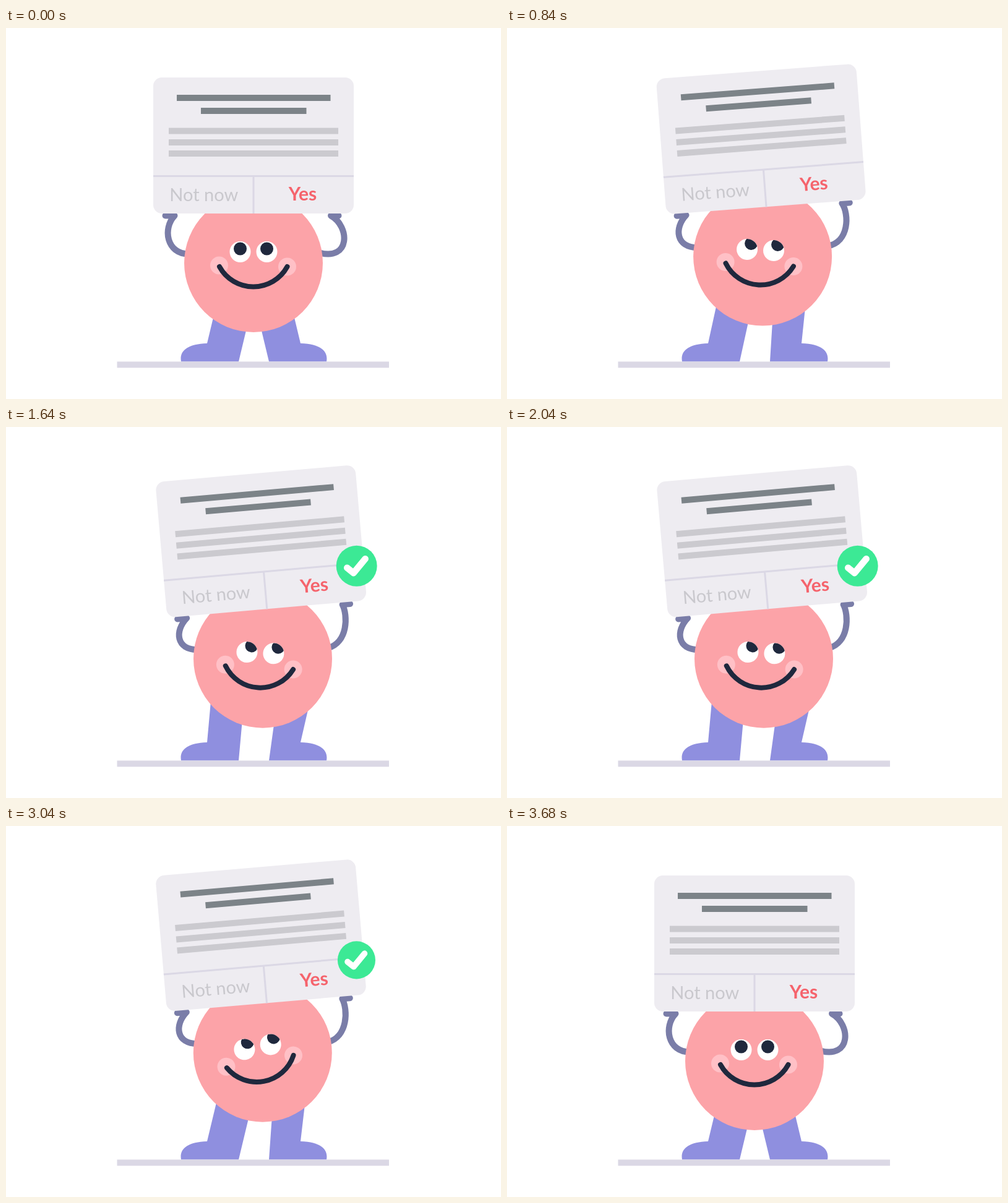
These frames come from a looping animation (800x600 px, 4.04 s). An HTML page:

```html
<!DOCTYPE html>
<html lang="en">
<head>
<meta charset="utf-8">
<title>Friendly prompt</title>
<style>
  html, body { margin: 0; width: 100%; height: 100%; overflow: hidden; background: #fff; }
  svg { display: block; width: 100vw; height: 100vh; }
  text { font: 29px Lato, sans-serif; text-anchor: middle; }
  .yes { font-size: 30px; font-weight: 700; }
</style>
</head>
<body>
<svg viewBox="0 0 800 600">
  <defs>
    <clipPath id="lidClip"><rect id="lid" x="-60" width="120" height="60"/></clipPath>
    <clipPath id="eyeClip"><circle cx="-21.5" cy="-18" r="17"/><circle cx="21.5" cy="-18" r="17"/></clipPath>
  </defs>
  <g fill="#8f8fdf">
    <path id="legL"/>
    <path id="legR" transform="matrix(-1 0 0 1 801 0)"/>
  </g>
  <rect x="179.5" y="539.5" width="439.5" height="10" fill="#dbd8e5"/>
  <g fill="none" stroke="#7a7da8" stroke-width="10" stroke-linecap="round" stroke-linejoin="round">
    <path id="armL"/>
    <path id="armR"/>
  </g>
  <circle id="head" r="112" fill="#fca3a8"/>
  <g id="face">
    <g fill="#ffc0c6"><circle cx="-55.5" cy="4" r="14.5"/><circle cx="54.5" cy="6" r="14.5"/></g>
    <path d="M-55 6A62.4 62.4 0 0 0 54.5 6" fill="none" stroke="#1f283d" stroke-width="8" stroke-linecap="round"/>
    <g clip-path="url(#lidClip)">
      <g fill="#fff"><circle cx="-21.5" cy="-18" r="17"/><circle cx="21.5" cy="-18" r="17"/></g>
      <g clip-path="url(#eyeClip)">
        <g id="pupils" fill="#1f283d"><circle cx="-21.5" cy="-18" r="10.5"/><circle cx="21.5" cy="-18" r="10.5"/></g>
      </g>
    </g>
  </g>
  <g id="card">
    <rect x="-162" y="-110" width="324" height="220" rx="14" fill="#eeecf1"/>
    <path d="M-124-77h248.5M-85-56h170.5" stroke="#7c8388" stroke-width="10"/>
    <path d="M-137-23.5h274M-137-5h274M-137 13h274" stroke="#cbcacf" stroke-width="10"/>
    <path d="M-162 49.5h324M0 49.5V110" stroke="#dbd8e5" stroke-width="3"/>
    <text x="-80.2" y="90" fill="#c9c8cd">Not now</text>
    <text x="79.5" y="89" fill="#f5636c" class="yes">Yes</text>
  </g>
  <g id="badge">
    <circle r="33" fill="#3ce995"/>
    <path d="M-15.5 3L-5 11.5L14-11.5" fill="none" stroke="#fff" stroke-width="10.5" stroke-linecap="round" stroke-linejoin="round"/>
  </g>
</svg>
<script>
const LOOP = 4040, STEP = 40;
const set = (id, name, value) => document.getElementById(id).setAttribute(name, value);
const mix = (a, b, k) => a + (b - a) * k;

// Smooth step from 0 at time a to 1 at time b.
function ramp(t, a, b) {
  const p = Math.min(1, Math.max(0, (t - a) / (b - a)));
  return p * p * (3 - 2 * p);
}
const blinkAt = (t, mid) => ramp(t, mid - 200, mid) - ramp(t, mid, mid + 200);

// Rise a little, crouch, spring up, bounce four times, hold, settle.
function bob(t, settle) {
  const bounce = t > 1040 && t < 2640 ? 4.1 * (1 - Math.cos((t - 1040) / 200 * Math.PI)) : 0;
  return -6 * ramp(t, 0, 240) + 18 * ramp(t, 240, 480) - 25.5 * ramp(t, 480, 940) + 13.5 * settle + bounce;
}

// Inward slope of a leg whose hip drops by u.
function bend(u) {
  u = Math.max(0, u);
  return 0.24 - 0.004 * u - 0.002 * u * u;
}

function legPath(s) {
  const splay = 0.25 * Math.min(0, s);
  const outer = s + splay, inner = s - splay;
  return `M283 539.5C280 523 292 511 325 510L${325 + outer * 110} 400H${376 + inner * 139.5}L376 539.5Z`;
}

// A flat hand from tip to wrist, then a curve to the shoulder; a and b are handle offsets.
function armPath(tip, wrist, a, shoulder, b) {
  const add = (p, q) => [p[0] + q[0], p[1] + q[1]];
  return `M${tip}L${wrist}C${add(wrist, a)} ${add(shoulder, b)} ${shoulder}`;
}

function draw(t) {
  const up = ramp(t, 560, 920), settle = ramp(t, 3000, 3560);
  const k = up - settle;
  const dy = bob(t, settle), drop = Math.max(0, dy);
  const tilt = 3 * up - 13.8 * ramp(t, 2200, 2640) + 10.8 * settle;
  const blink = blinkAt(t, 560) + blinkAt(t, 3480);
  const pop = ramp(t, 1120, 1360) - ramp(t, 3000, 3240);

  const hx = 400 + 15 * k - 0.04 * drop, hy = 380 + dy;
  const cx = hx - 2.8 * k, cy = hy - 190;
  const angle = -5 * k, rad = angle * Math.PI / 180;
  const sin = Math.sin(rad), cos = Math.cos(rad);
  const onCard = (x, y) => [cx + x * cos - y * sin, cy + x * sin + y * cos];
  const grip = x => onCard(x - 3 * k, 113.5);

  set('legL', 'd', legPath(mix(bend(dy), bend(dy + 13), k)));
  set('legR', 'd', legPath(mix(bend(dy), -0.24 - 0.0106 * dy, k)));
  set('armL', 'd', armPath(grip(-142.5), grip(-127.5), [-20, 21], [hx - 105, hy - 14.5], [-35, 0]));
  set('armR', 'd', armPath(grip(137.5), grip(125), [mix(31, 9, k), 17],
    [hx + 105, hy - 17], [mix(52, 33, k), mix(15, -9, k)]));

  set('head', 'transform', `translate(${hx} ${hy})`);
  set('face', 'transform', `translate(${hx - 5 * k} ${hy + 8.5 * k}) rotate(${tilt})`);
  set('lid', 'y', -35.5 + 35 * blink);
  set('pupils', 'transform', `translate(${7 * k} ${mix(-5 + drop * 0.37, -10.5, k)})`);
  set('card', 'transform', `translate(${cx} ${cy}) rotate(${angle})`);
  set('badge', 'transform', `translate(${onCard(150.4, 53.3)}) scale(${pop})`);
}

let start;
function tick(now) {
  if (start === undefined) start = now;
  draw(Math.floor((now - start) % LOOP / STEP) * STEP);
  requestAnimationFrame(tick);
}
draw(0);
requestAnimationFrame(tick);
</script>
</body>
</html>
```
